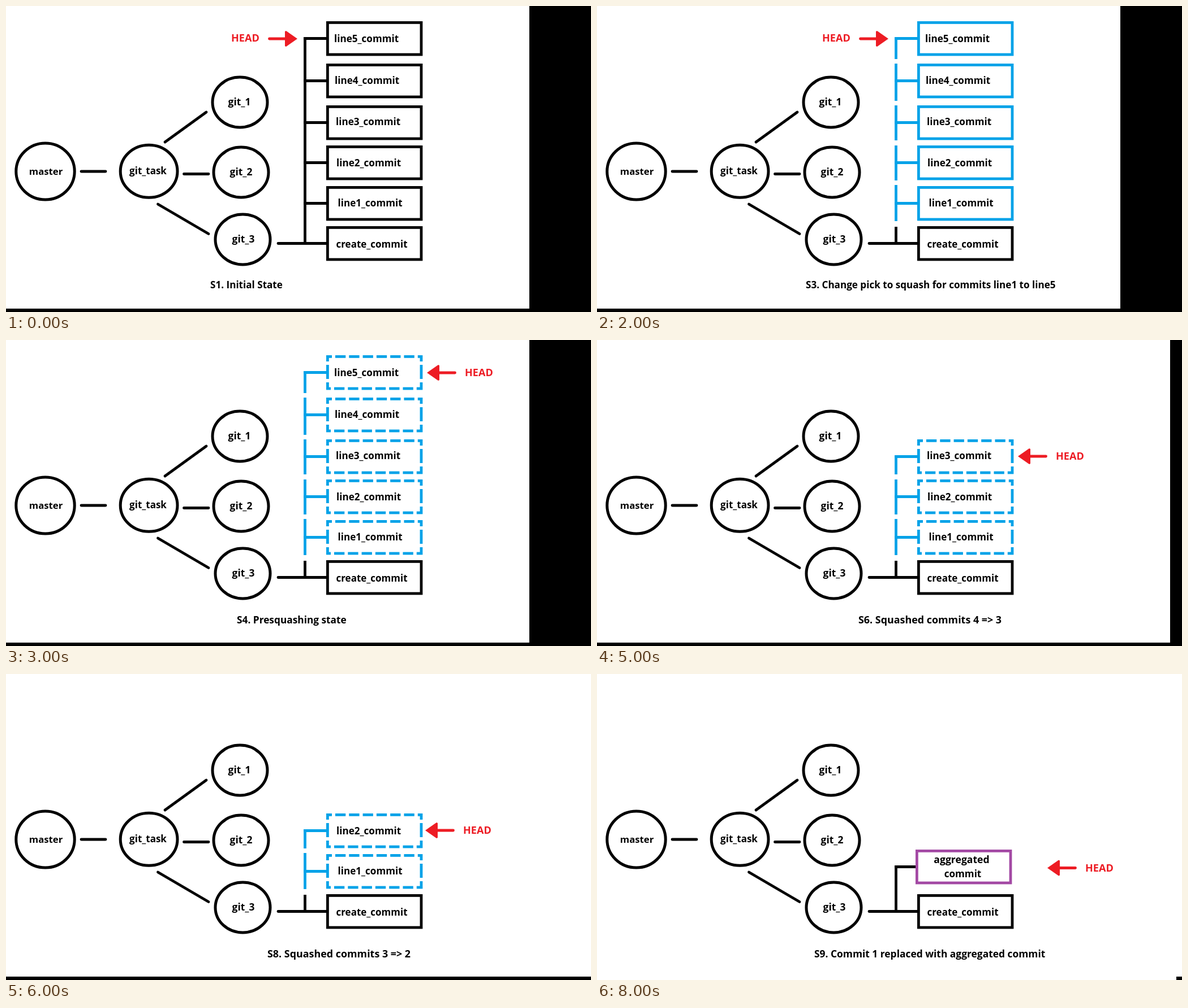
An HTML page with a canvas that plays this animation: 1034 by 542 pixels, repeating every 9 s.

```html
<!DOCTYPE html>
<html lang="en">
<head>
<meta charset="utf-8">
<title>Squashing commits</title>
<style>
html, body { margin: 0; width: 100%; height: 100%; overflow: hidden; background: #fff; }
canvas { display: block; }
</style>
</head>
<body>
<canvas id="stage" width="1034" height="542"></canvas>
<script>
const ctx = document.getElementById('stage').getContext('2d');
const BLACK = '#000', BLUE = '#00a2e8', RED = '#ed1c24', PURPLE = '#a349a4';
const STEP = 1000;
const SPINE = 528.5;

// Top commit first: box top, connector height, spine range, label position
const commits = [
  { name: 'line5_commit', top: 27, mid: 57.5, from: 55, to: 94, x: 580, base: 64 },
  { name: 'line4_commit', top: 102, mid: 132.5, from: 102, to: 168, x: 581, base: 138 },
  { name: 'line3_commit', top: 176, mid: 206.5, from: 176, to: 238, x: 583, base: 211 },
  { name: 'line2_commit', top: 247, mid: 277.5, from: 247, to: 309, x: 584, base: 284 },
  { name: 'line1_commit', top: 319, mid: 349.5, from: 317, to: 381, x: 586.5, base: 355 }
];

// skip: how many commits are already squashed; head: [tip x, y]
const states = [
  { text: 'S1. Initial State', x: 361, size: 17.1, style: 'plain', wall: 925 },
  { text: 'S2.  Pick state', x: 356.5, size: 16.8, style: 'pick', wall: 925 },
  { text: 'S3. Change pick to squash for commits line1 to line5', x: 369, size: 17.1, style: 'pick', wall: 925 },
  { text: 'S4. Presquashing state', x: 408, size: 17.3, base: 502, style: 'dash', head: [744, 58], wall: 925 },
  { text: 'S5. Squashed commits 5 => 4', skip: 1, head: [744, 132], wall: 1013 },
  { text: 'S6. Squashed commits 4 => 3', skip: 2, head: [744, 206], wall: 1013 },
  { text: 'S8. Squashed commits 3 => 2', skip: 3, head: [741, 277] },
  { text: 'S7. Squashed commits 2 => 1', skip: 4, head: [741, 349] },
  { text: 'S9. Commit 1 replaced with aggregated commit', x: 384, size: 17.4, style: 'merged', head: [796, 343.5] }
];

function label(text, x, y, size = 17.1, color = BLACK, align = 'left') {
  ctx.font = `bold ${size}px "Open Sans", "Noto Sans", sans-serif`;
  ctx.textAlign = align;
  ctx.fillStyle = color;
  ctx.fillText(text, x, y);
}

function line(x1, y1, x2, y2, color = BLACK, cap = 'butt') {
  ctx.lineCap = cap;
  ctx.lineWidth = 4.8;
  ctx.strokeStyle = color;
  ctx.beginPath();
  ctx.moveTo(x1, y1);
  ctx.lineTo(x2, y2);
  ctx.stroke();
}

function node(text, x, y, rx, ry, tx, base, size = 17.4) {
  ctx.lineWidth = 5;
  ctx.strokeStyle = BLACK;
  ctx.beginPath();
  ctx.ellipse(x, y, rx, ry, 0, 0, Math.PI * 2);
  ctx.stroke();
  label(text, tx, base, size, BLACK, 'center');
}

function box(x, y, color) {
  ctx.lineWidth = 4.8;
  ctx.lineJoin = 'miter';
  ctx.strokeStyle = color;
  ctx.strokeRect(x + 2.4, y + 2.4, 165.6, 56.6);
}

function dashedBox(x, y) {
  box(x, y, BLUE);
  ctx.fillStyle = '#fff';
  for (let i = 0; i < 7; i++) {
    ctx.fillRect(x + 10 + i * 24.3, y - 1, 6, 8);
    ctx.fillRect(x + 8 + i * 24.3, y + 54, 6, 8);
  }
  for (const gap of [11, 42]) {
    ctx.fillRect(x - 1, y + gap, 8, 6);
    ctx.fillRect(x + 163, y + gap, 8, 6);
  }
}

function arrow(tip, y, dir) {
  line(tip - dir * 20, y, tip - dir * 49.5, y, RED, 'round');
  ctx.fillStyle = RED;
  ctx.beginPath();
  ctx.moveTo(tip, y);
  ctx.lineTo(tip - dir * 20, y - 14);
  ctx.lineTo(tip - dir * 22, y - 13);
  ctx.lineTo(tip - dir * 22, y + 13);
  ctx.lineTo(tip - dir * 20, y + 14);
  ctx.closePath();
  ctx.fill();
}

function drawTree() {
  node('master', 69.5, 293, 51.7, 50, 70.5, 299, 16.7);
  node('git_task', 252.6, 292.7, 50.4, 46.5, 251, 298, 17);
  node('git_1', 413.5, 170.5, 48.5, 44.5, 412.5, 176);
  node('git_2', 415.5, 294.5, 48.5, 44.5, 415.5, 300);
  node('git_3', 418.5, 413.5, 48.5, 44.5, 419.5, 419);
  line(133, 293, 176, 293, BLACK, 'round');
  line(281, 241, 354, 188, BLACK, 'round');
  line(314.5, 297.5, 358, 297.5, BLACK, 'round');
  line(268.5, 351, 358, 403.5, BLACK, 'round');
  line(481, 420.5, 567, 420.5, BLACK, 'round');
  box(566, 390, BLACK);
  label('create_commit', 583.5, 428, 17);
}

function drawCommits(style, skip) {
  const color = style === 'plain' ? BLACK : BLUE;
  commits.slice(skip).forEach((c, i) => {
    const from = i ? c.from : c.mid - 2.4;
    if (style !== 'plain') line(SPINE, from, SPINE, c.to, color);
    line(SPINE - 2.4, c.mid, 567, c.mid, color);
    if (style === 'dash') dashedBox(566, c.top);
    else box(566, c.top, color);
    label(c.name, c.x, c.base);
  });
  line(SPINE, style === 'plain' ? 55.1 : 391, SPINE, 420);
}

function drawMerged() {
  line(SPINE, 339.1, SPINE, 420);
  line(SPINE - 2.4, 341.5, 564, 341.5);
  box(563, 311, PURPLE);
  label('aggregated', 644.5, 335, 17.6, BLACK, 'center');
  label('commit', 646.5, 359.5, 17.1, BLACK, 'center');
}

function drawHead(head) {
  if (!head) {
    label('HEAD', 398, 63, 18.1, RED);
    arrow(515, 58, 1);
    return;
  }
  const [tip, y] = head;
  label('HEAD', tip + 67, y + 6, 18.1, RED);
  arrow(tip, y, -1);
}

function draw(now) {
  const s = states[Math.floor(now / STEP) % states.length];
  const { style = 'dash', skip = 0, x = 462, base = s.head ? 502 : 500, size = 17.9 } = s;
  ctx.fillStyle = '#fff';
  ctx.fillRect(0, 0, 1034, 542);
  drawTree();
  if (style === 'merged') drawMerged();
  else drawCommits(style, skip);
  drawHead(s.head);
  label(s.text, x, base, size);

  ctx.fillStyle = BLACK;
  if (s.wall) ctx.fillRect(s.wall, 0, 1034 - s.wall, 542);
  const floor = style === 'merged' ? 1024 : 0;
  ctx.fillRect(floor, 536, 1034 - floor, 6);
}

const start = performance.now();
function tick() {
  draw(performance.now() - start);
  requestAnimationFrame(tick);
}
tick();
</script>
</body>
</html>
```
